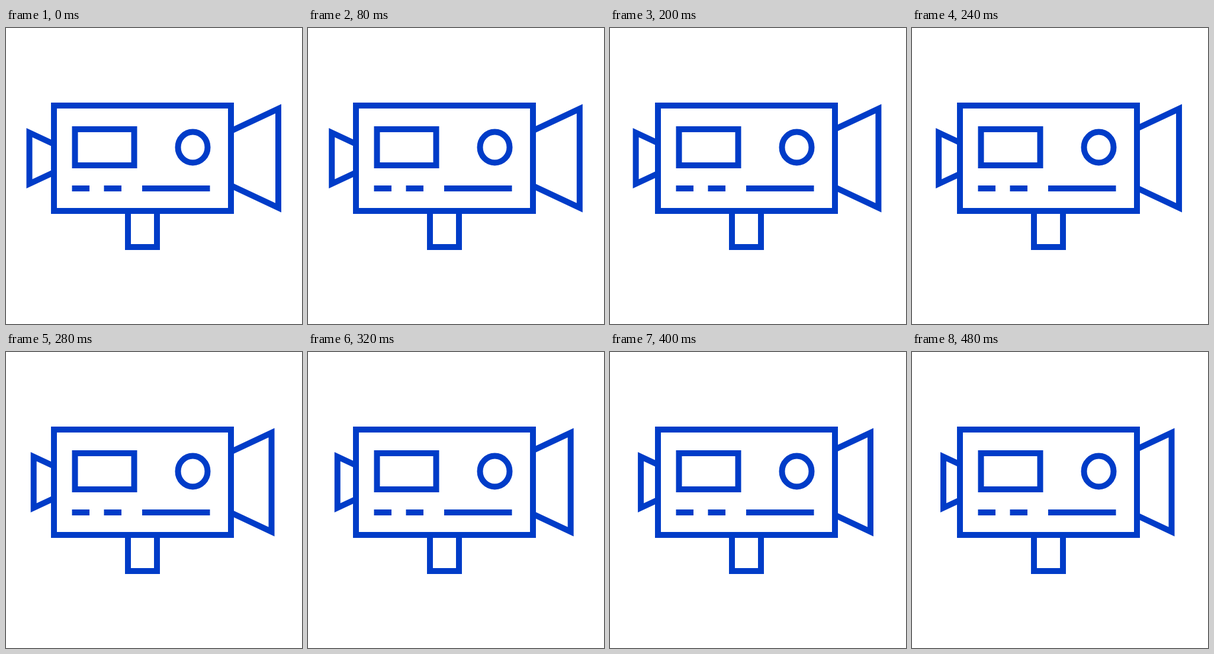
An HTML page for the animation above (520 ms loop, 500 by 500 pixels).

```html
<!DOCTYPE html>
<html lang="en">
<head>
<meta charset="utf-8">
<title>Camera</title>
<style>
  html, body { margin: 0; width: 100%; height: 100%; overflow: hidden; background: #fff; }
  svg { display: block; width: 100vw; height: 100vh; }
</style>
</head>
<body>
<svg viewBox="0 0 500 500" fill="none" stroke="#003cc8" stroke-width="10" stroke-miterlimit="10">
  <path id="eyepiece" d="M95 202.7 L39.5 176.8 V263.2 L95 237.3"/>
  <path id="hood" d="M365 181 L460 136.4 V303.6 L365 259"/>
  <path d="M206 309 V370 H255 V309"/>
  <rect x="81" y="131" width="299" height="178" fill="#fff"/>
  <rect x="116.5" y="171" width="100" height="61"/>
  <ellipse cx="315.5" cy="201.5" rx="25" ry="26"/>
  <path d="M111.5 271 H141 M165.5 271 H195 M230 271 H344.5"/>
</svg>
<script>
  const LOOP = 520, STEP = 40, LAST = 13;
  const eyepiece = document.getElementById('eyepiece');
  const hood = document.getElementById('hood');
  const smooth = u => u * u * (3 - 2 * u);
  const slide = (el, x) => el.setAttribute('transform', `translate(${x.toFixed(2)} 0)`);

  function draw(ms) {
    let step = Math.floor((ms % LOOP) / STEP);
    if (step > 7) step++; // the motion skips one beat here
    const k = smooth(Math.pow(step / LAST, 1.05));
    slide(eyepiece, 13.5 * k);
    slide(hood, -21.5 * k);
  }

  const start = performance.now();
  function tick() {
    draw(performance.now() - start);
    requestAnimationFrame(tick);
  }
  tick();
</script>
</body>
</html>
```
